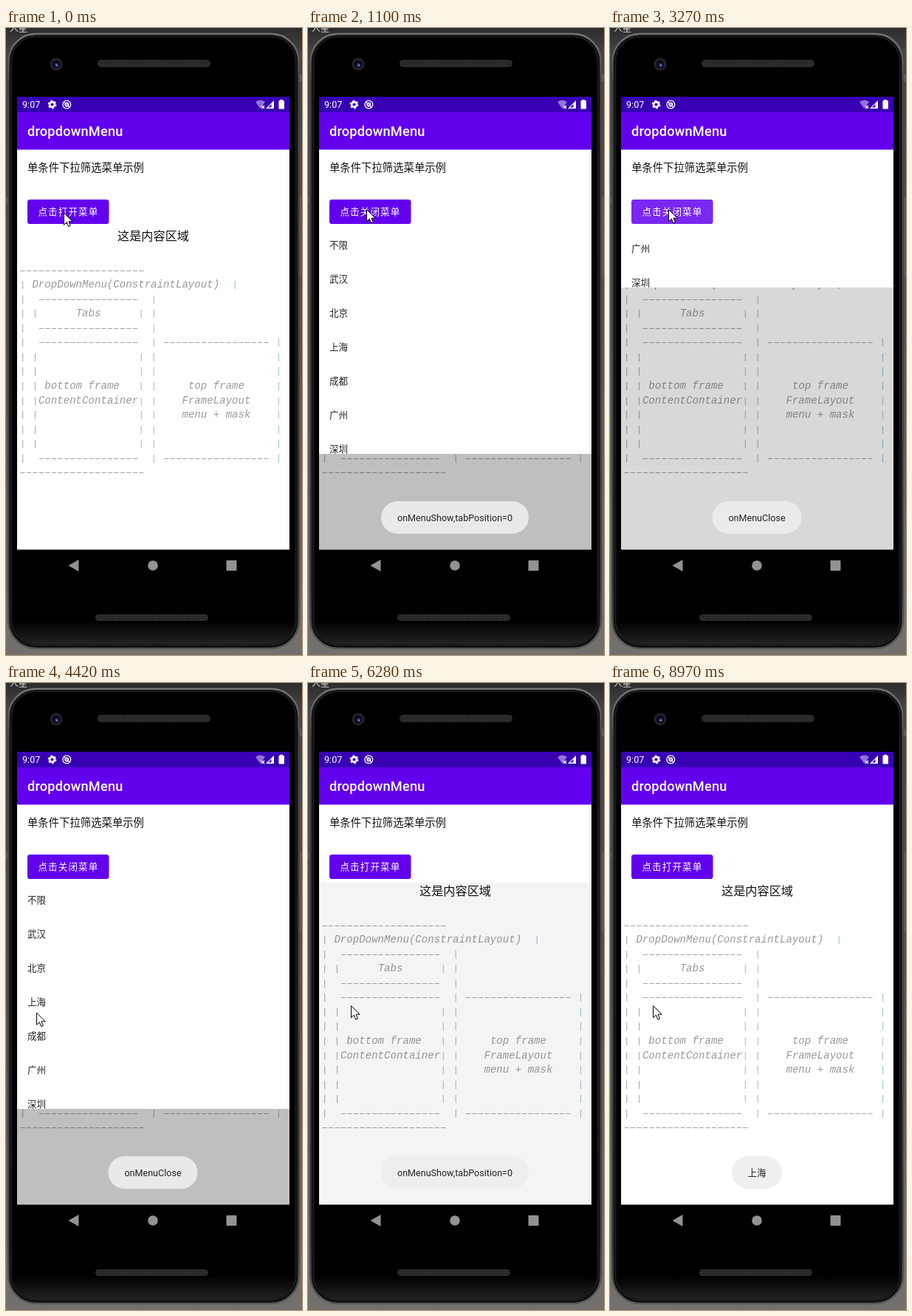
Write an HTML page that moves like this. It is 401 px wide and 848 px high and loops after 9150 ms.

```html
<!DOCTYPE html>
<html lang="zh-CN">
<head>
<meta charset="utf-8">
<title>dropdownMenu</title>
<style>
  html, body { margin: 0; width: 100%; height: 100%; overflow: hidden; background: #333; }
  svg { display: block; }
  text { font-family: Roboto, "Noto Sans CJK SC", "Noto Sans CJK", sans-serif; white-space: pre; }
  .diagram text { font: italic 14.1px "Liberation Mono", monospace; fill: #999; }
  .small { font-size: 12.57px; fill: #222; }
</style>
</head>
<body>
<svg width="401" height="848" viewBox="0 0 401 848">
  <defs>
    <linearGradient id="room" x2="0" y2="1">
      <stop offset="0" stop-color="#2c2c2c"/><stop offset=".04" stop-color="#444"/>
      <stop offset=".5" stop-color="#555"/><stop offset="1" stop-color="#74716d"/>
    </linearGradient>
    <linearGradient id="rim" x2="0" y2="1">
      <stop offset="0" stop-color="#777"/><stop offset=".08" stop-color="#444"/>
      <stop offset=".9" stop-color="#3c3c3c"/><stop offset="1" stop-color="#555"/>
    </linearGradient>
    <linearGradient id="shell" x2="0" y2="1">
      <stop offset=".96" stop-color="#000"/><stop offset="1" stop-color="#242424"/>
    </linearGradient>
    <pattern id="mesh" width="3" height="3" patternUnits="userSpaceOnUse">
      <path d="M0 0H3V3H0Z" fill="#303030"/><path d="M0 0h1.5v1.5H0Z" fill="#181818"/>
    </pattern>
    <clipPath id="area"><path d="M15 270H384V706H15Z"/></clipPath>
    <clipPath id="sheet"><path d="M15 270H384V576H15Z"/></clipPath>
  </defs>

  <!-- Phone body -->
  <path d="M0 0H401V848H0Z" fill="url(#room)"/>
  <text x="5" y="5" font-size="12" fill="#ddd">人星</text>
  <path d="M396 62h5v10h-5ZM396 229h5v108h-5ZM0 229h3v8H0Z" fill="#5a5a5a"/>
  <rect x="3.5" y="8" width="393" height="831" rx="37" fill="#000" stroke="url(#rim)" stroke-width="2.5"/>
  <rect x="7" y="11" width="386" height="824" rx="34" fill="url(#shell)" stroke="#191919" stroke-width="3"/>
  <rect x="124" y="43" width="153" height="10" rx="5" fill="url(#mesh)"/>
  <rect x="121" y="793" width="153" height="9" rx="4.5" fill="url(#mesh)"/>
  <circle cx="68" cy="49" r="8.5" fill="#242426"/>
  <circle cx="68" cy="49" r="5.5" fill="#0b0b1c"/>
  <circle cx="68.5" cy="50" r="2.5" fill="#27347c"/>
  <circle cx="69" cy="50.5" r="1" fill="#94a6ee"/>

  <!-- Screen and bars -->
  <path d="M15 93H384V705.600H15Z" fill="#fff"/>
  <path d="M15 93H384V114H15Z" fill="#3700b3"/>
  <path d="M15 114H384V164.400H15Z" fill="#6200ee"/>
  <g fill="#fff">
    <text x="22" y="108.3" font-size="12.6">9:07</text>
    <g fill="none" stroke="#fff">
      <circle cx="62.5" cy="103.5" r="3.4" stroke-width="2.6"/>
      <circle cx="62.5" cy="103.5" r="5" stroke-width="1.8" stroke-dasharray="2.6 2.636"/>
      <circle cx="82.3" cy="103.5" r="5.4" stroke-width="1.3"/>
      <circle cx="82.3" cy="103.5" r="2.2" stroke-width="1.6"/>
      <path d="M78.6 99.8l7.4 7.4" stroke-width="1.2"/>
      <path d="M346 105l4 4m0-4l-4 4" stroke-width="1.3"/>
    </g>
    <path d="M338 100Q344.5 95 351 100L344.5 109Z" opacity=".45"/>
    <path d="M363 98V109H352Z"/>
    <path d="M359.5 103V107.5H355Z" fill="#3700b3"/>
    <path d="M371 97h4v1.3h2V109.5h-7.5V98.3H371Z"/>
    <text x="29" y="146.3" font-size="18.2" font-weight="500" letter-spacing=".2">dropdownMenu</text>
  </g>
  <g fill="#929292">
    <path d="M84.5 727L98.5 719V735Z"/>
    <circle cx="199" cy="727" r="6.8"/>
    <rect x="298.5" y="720" width="14" height="14" rx="1"/>
  </g>

  <!-- Page -->
  <text x="29" y="193.7" font-size="14.37" fill="#111">单条件下拉筛选菜单示例</text>
  <rect x="29" y="232" width="110.5" height="33" rx="3.6" fill="#6200ee"/>
  <rect id="ripple" x="29" y="232" width="110.5" height="33" rx="3.6" fill="#fff"/>
  <text id="label" x="43.4" y="253.2" font-size="12.57" letter-spacing="1.12" fill="#fff"></text>
  <g clip-path="url(#area)">
    <text x="199.5" y="287.2" font-size="16.16" text-anchor="middle" fill="#111">这是内容区域</text>
    <g id="diagram" class="diagram"></g>
    <path id="mask" d="M15 270H384V705.600H15Z"/>
    <g id="menu" clip-path="url(#sheet)"><path d="M15 270H384V576H15Z" fill="#fff"/></g>
  </g>
  <g id="toasts"></g>
  <path id="cursor" d="M0 0V16.2L3.8 12.7 6.3 18.6 8.9 17.5 6.4 11.7H11.6Z" fill="#fff" stroke="#000"/>
</svg>

<script>
const LOOP = 9150;
const $ = id => document.getElementById(id);

function add(parent, tag, attrs, text = '') {
  const node = document.createElementNS('http://www.w3.org/2000/svg', tag);
  for (const key in attrs) node.setAttribute(key, attrs[key]);
  node.textContent = text;
  parent.append(node);
  return node;
}

function buildDiagram() {
  const left = 18.5, top = 328, cell = 8.46, pitch = 19.57;
  const rule = '-'.repeat(20);
  const lid = '|  ----------------  |';
  const wideLid = lid + ' ----------------- |';
  const empty = '| |                | |                   |';
  const rows = [
    rule,
    '| DropDownMenu(ConstraintLayout)  |',
    lid,
    '| |      Tabs      | |',
    lid,
    wideLid,
    empty,
    empty,
    '| | bottom frame   | |     top frame     |',
    '| |ContentContainer| |    FrameLayout    |',
    '| |                | |    menu + mask    |',
    empty,
    empty,
    wideLid,
    rule
  ];
  const barColors = { 19: '#d6b9a0', 21: '#9fc3e3', 34: '#9fc3e3', 41: '#a9c5dc' };
  rows.forEach((row, i) => {
    const y = Math.floor(top + i * pitch) + .5;
    for (const { 0: run, index } of row.matchAll(/\||-+|[^\s|-]+(?: [^\s|-]+)*/g)) {
      const x = left + index * cell;
      if (run === '|') {
        add($('diagram'), 'rect', { x: x + 3.5, y: y - 5.5, width: 1.2, height: 11, fill: barColors[index] || '#b5b0aa' });
      } else if (run[0] === '-') {
        add($('diagram'), 'path', {
          d: `M${x + 1} ${y}h${run.length * cell - 2}`, stroke: '#a2a2a2', 'stroke-dasharray': `6.2 ${cell - 6.2}`
        });
      } else {
        add($('diagram'), 'text', { x, y: y + 3.7 }, run);
      }
    }
  });
}

buildDiagram();
['不限', '武汉', '北京', '上海', '成都', '广州', '深圳'].forEach((city, i) =>
  add($('menu'), 'text', { x: 29, y: 297.8 + i * 46.1, class: 'small' }, city));

const toasts = [
  [520, 'onMenuShow,tabPosition=0', 200],
  [2590, 'onMenuClose', 121],
  [4570, 'onMenuShow,tabPosition=0', 200],
  [6560, 'onMenuClose', 121],
  [8540, '上海', 68]
].map(([start, message, width]) => {
  const node = add($('toasts'), 'g', {});
  add(node, 'rect', { x: 199 - width / 2, y: 640, width, height: 44, rx: 22, fill: '#eee', 'fill-opacity': .9 });
  add(node, 'text', { x: 199, y: 667, class: 'small', 'text-anchor': 'middle' }, message);
  return { start, node };
});

const progress = (t, start, duration) => Math.min(1, Math.max(0, (t - start) / duration));
const ease = (...args) => (1 - Math.cos(Math.PI * progress(...args))) / 2;

// Each move: start, duration, x, y
const cursorMoves = [
  [160, 0, 79.5, 245.5], [4040, 380, 41.5, 446], [4570, 90, 44.5, 436.5],
  [5620, 0, 54, 424.5], [5720, 0, 58.5, 436.5]
];

function cursorAt(t) {
  let x = 78.5, y = 250;
  for (const [start, duration, toX, toY] of cursorMoves) {
    if (t < start) break;
    const p = duration ? ease(t, start, duration) : 1;
    x += (toX - x) * p;
    y += (toY - y) * p;
  }
  return `translate(${x} ${y})`;
}

// Each tap: press time, click time
const taps = [[400, 500], [2140, 2313], [3090, 3185]];
const rippleAt = t => taps.reduce((sum, [press, click]) =>
  sum + .19 * (progress(t, press, 75) - progress(t, click + 50, 180)), 0);

function draw(t) {
  const slide = ease(t, 500, 250) - ease(t, 2313, 250) + ease(t, 3185, 250) - ease(t, 6100, 150);
  const shade = ease(t, 500, 150) - ease(t, 2313, 250) + ease(t, 3185, 150) - ease(t, 6100, 250);
  const open = t >= 500 && t < 2313 || t >= 3185 && t < 6100;
  $('menu').setAttribute('transform', `translate(0 ${-306 * (1 - slide)})`);
  $('mask').setAttribute('opacity', .25 * shade);
  $('ripple').setAttribute('opacity', rippleAt(t));
  $('label').textContent = open ? '点击关闭菜单' : '点击打开菜单';
  $('cursor').setAttribute('transform', cursorAt(t));
  toasts.forEach(({ start, node }, i) => {
    const enter = progress(t, start, 410);
    const leave = i + 1 < toasts.length ? progress(t, toasts[i + 1].start, 410) : 0;
    node.setAttribute('opacity', (1 - (1 - enter) ** 2) * (1 - leave ** 2));
  });
}

const began = performance.now();
function tick() {
  draw((performance.now() - began) % LOOP);
  requestAnimationFrame(tick);
}
tick();
</script>
</body>
</html>
```
